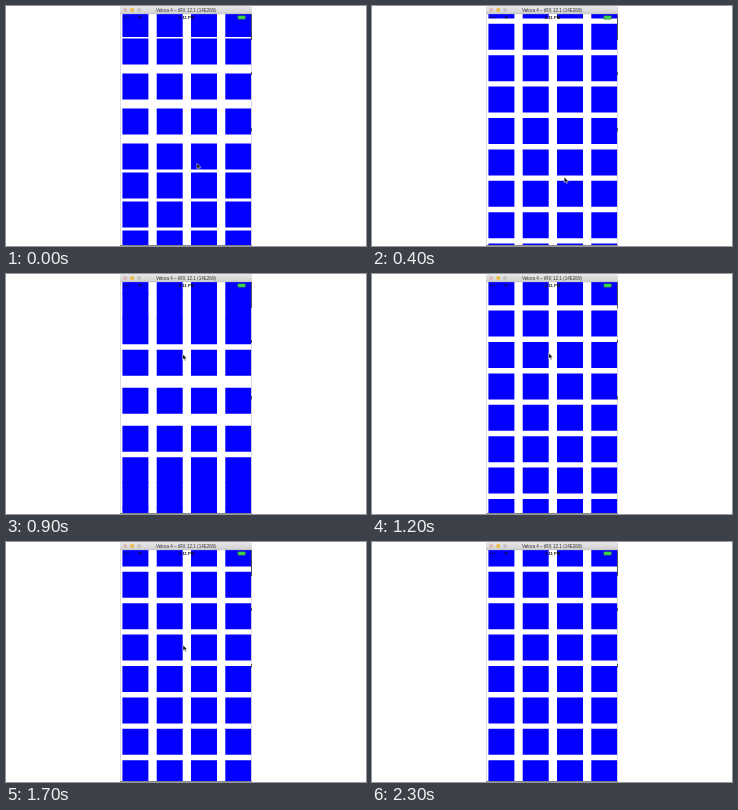
Animation of 360 by 240 pixels, one loop 2400 ms. Source, as an HTML page:

```html
<!DOCTYPE html>
<html lang="en">
<head>
<meta charset="utf-8">
<title>Springy grid</title>
<style>
  html, body { margin: 0; width: 100%; height: 100%; overflow: hidden; background: #fff; }
  svg { display: block; width: 360px; height: 240px; }
  text { font-family: "Liberation Sans", Arial, sans-serif; text-anchor: middle; }
</style>
</head>
<body>
<svg viewBox="0 0 360 240">
  <defs>
    <linearGradient id="chrome" x2="0" y2="1">
      <stop offset="0" stop-color="#e9e9e9"/>
      <stop offset="1" stop-color="#cfcfcf"/>
    </linearGradient>
    <clipPath id="screen"><rect x="115" y="8" width="130.5" height="231.5"/></clipPath>
  </defs>

  <g id="grid" clip-path="url(#screen)" fill="#0400ff"></g>

  <g id="status">
    <g fill="#111" opacity=".75">
      <circle cx="118.4" cy="11.5" r=".7"/>
      <circle cx="120.4" cy="11.5" r=".7"/>
      <circle cx="122.4" cy="11.5" r=".7"/>
      <path d="M132 10.4h4l-2 2.6z"/>
    </g>
    <text x="180.5" y="13" font-size="4.2" font-weight="bold" fill="#111">2:11 PM</text>
    <rect x="231.8" y="9.7" width="7.6" height="3.5" rx=".6" fill="#3fd84f" stroke="#26543a" stroke-width=".5"/>
  </g>

  <g id="window">
    <path d="M114.5 8V239.5H245.5V8" fill="none" stroke="#c4c4c8" stroke-width=".6"/>
    <path d="M114 239.5H246" stroke="#77777c" stroke-width=".8"/>
    <path d="M245.5 8V34M245.5 66V69M245.5 122V125.5" stroke="#33333c" stroke-width=".8"/>
    <path d="M114 8V1.5Q114 0 115.5 0H244.5Q246 0 246 1.5V8z" fill="url(#chrome)"/>
    <path d="M114 7.8H246" stroke="#b5b5b5" stroke-width=".5"/>
    <circle cx="119.2" cy="4" r="2" fill="#dcb6b0"/>
    <circle cx="126.2" cy="4" r="2" fill="#f0b843"/>
    <circle cx="133" cy="4" r="2" fill="#c6c6be"/>
    <text x="180" y="5.7" font-size="4.6" fill="#333">Velora 4 – tRX 12.1 (14E269)</text>
  </g>

  <path id="cursor" d="M0 0V5.8L1.4 4.6L2.3 6.7L3.3 6.2L2.4 4.3H4.2z"
        fill="#111" stroke="#fff" stroke-width=".45"/>
</svg>
<script>
const LOOP = 2400, STEP = 100, PITCH = 31.4, SIZE = 26, CORE = 1.5;

// step, centre, pitch near the centre, pitch above, pitch below
const poses = [
  [0, 85, 35, 27.5, 29],
  [1, 93, 32.6, 30.2, 30.6],
  [2, 112, PITCH, PITCH, PITCH],
  [7, 206, PITCH, PITCH, PITCH],
  [8, 164, 36, 27, 27],
  [9, 113.7, 38, 25, 25],
  [10, 90, 34.6, 28.6, 28.6],
  [11, 75, 32.3, 30.5, 30.5],
  [12, 68, PITCH, PITCH, PITCH],
  [13, 72, PITCH, PITCH, PITCH],
  [14, 79, PITCH, PITCH, PITCH],
  [15, 86, PITCH, PITCH, PITCH],
  [16, 91, PITCH, PITCH, PITCH],
  [17, 92.6, PITCH, PITCH, PITCH]
];

// step, x, y
const track = [
  [0, 190.8, 157], [2, 191.2, 159.5], [7, 193.6, 188],
  [9, 176.6, 80], [12, 176.6, 79], [17, 177, 103], [20, 177, 103]
];

const grid = document.getElementById("grid");
const cursor = document.getElementById("cursor");
const columns = [0, 1, 2, 3]
  .map(i => `M${116.4 + i * 34.3} 0h${SIZE}v${SIZE}h${-SIZE}z`).join("");

const rows = [];
for (let i = -8; i <= 8; i++) {
  const el = document.createElementNS("http://www.w3.org/2000/svg", "path");
  el.setAttribute("d", columns);
  grid.append(el);
  rows.push({ i, el });
}

function drawRows(step) {
  const [, centre, near, above, below] = poses.findLast(p => p[0] <= step);
  const shift = step < 2 ? 0.5 : 0;
  for (const { i, el } of rows) {
    const d = i + shift, n = Math.abs(d);
    const far = d < 0 ? above : below;
    const reach = near * Math.min(n, CORE) + far * Math.max(0, n - CORE);
    el.setAttribute("transform", `translate(0 ${centre + Math.sign(d) * reach})`);
  }
}

function drawCursor(step) {
  const k = track.findIndex(p => p[0] > step);
  cursor.style.display = k < 0 ? "none" : "";
  if (k < 0) return;
  const [s, x, y] = track[k - 1], [s2, x2, y2] = track[k];
  const f = (step - s) / (s2 - s);
  cursor.setAttribute("transform", `translate(${x + (x2 - x) * f} ${y + (y2 - y) * f})`);
}

function draw() {
  const step = Math.floor(performance.now() % LOOP / STEP);
  drawRows(step);
  drawCursor(step);
  requestAnimationFrame(draw);
}
draw();
</script>
</body>
</html>
```
